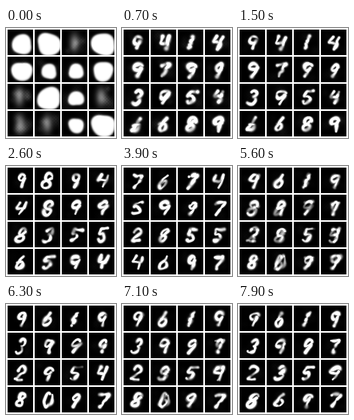
Write a matplotlib script that moves like this. It is 138 px wide and 138 px high and loops after 8 s.

```python
import numpy as np
import matplotlib.pyplot as plt
from matplotlib.animation import FuncAnimation

FRAMES, STEP = 80, 100
TILE, PAD, COLS = 32, 2, 4
SIDE = COLS * (TILE + PAD) + PAD
CELLS = COLS * COLS
N = 48  # points along a stroke

# Digits the tiles pass through, by time step
STAGES = {
    15: "9414" "9799" "3954" "6689",
    26: "9894" "4899" "8355" "6594",
    39: "7674" "5997" "2855" "4697",
    49: "4619" "8877" "7853" "8679",
    63: "9619" "3999" "2954" "8097",
    79: "9619" "3997" "2359" "8697",
}
TIMES = list(STAGES)

# Opening blobs: Large, Medium, Small, or a grey Cloud
START = "MLCL" "MSSM" "CLSC" "CCSL"
RADIUS = {"L": 14.5, "M": 12.5, "S": 9.5}

yy, xx = np.mgrid[:TILE, :TILE].astype(float)


def arc(cy, rx, ry, start, end):
    a = np.radians(np.linspace(start, end, 24))
    return list(zip(rx * np.cos(a), cy + ry * np.sin(a)))


# Pen paths, y down, in -1..1
PATHS = {
    "0": arc(0, .55, .9, -60, 300),
    "1": [(0, -.9), (0, .9)],
    "2": arc(-.45, .55, .45, -170, 50) + [(-.6, .85), (.7, .8)],
    "3": arc(-.45, .5, .45, -150, 80) + arc(.42, .55, .48, -80, 150),
    "4": [(-.45, -.85), (-.6, 0), (.5, 0), (.5, -.85), (.4, .9)],
    "5": [(.65, -.85), (-.35, -.8), (-.45, -.1)] + arc(.35, .5, .5, -110, 140),
    "6": [(.1, -.9)] + arc(.4, .5, .5, 200, -150),
    "7": [(-.6, -.7), (.6, -.8), (.1, .9)],
    "8": arc(-.45, .45, .45, 0, -270) + arc(.45, .5, .45, -90, 270) + [(.45, -.45)],
    "9": arc(-.4, .5, .45, -20, -360) + [(.3, .9)],
}


def smooth(a, k=5):
    pad = np.pad(a, k // 2, mode="edge")
    return np.convolve(pad, np.ones(k) / k, mode="valid")


def wave(rng, knots, amount):
    u = np.linspace(0, knots - 1, N)
    return smooth(np.interp(u, np.arange(knots), rng.normal(0, amount, knots)))


def trace(digit):
    p = np.array(PATHS[digit])
    s = np.r_[0, np.cumsum(np.hypot(*np.diff(p, axis=0).T))]
    u = np.linspace(0, s[-1], N)
    return [smooth(np.interp(u, s, q), 3) for q in p.T]


def write(digit, rng):
    """A digit by an unsteady hand: points, brightness and pen width."""
    x, y = trace(digit)
    slant, wide = rng.normal(.38, .07), rng.normal(.95, .08)
    px = 16 + 8.8 * (x * wide - slant * y) + wave(rng, 9, .7)
    py = 16.3 + 9 * y + wave(rng, 9, .6)
    ink = np.clip(1.05 + wave(rng, 10, .4), .2, 1.3)
    pen = np.clip(1.9 + wave(rng, 10, .5), 1.1, 3)
    return px, py, ink, pen


hand = np.random.default_rng(7)
POSES = {t: [write(d, hand) for d in digits] for t, digits in STAGES.items()}


def blend(i):
    """Poses around step i and the weight of the later one."""
    if i <= TIMES[0]:
        return TIMES[0], TIMES[0], 0
    k = min(np.searchsorted(TIMES, i) - 1, len(TIMES) - 2)
    a, b = TIMES[k], TIMES[k + 1]
    u = (i - a) / (b - a)
    return a, b, u * u * (3 - 2 * u)


def haze(rng):
    """Soft cloudy texture with a fine lattice."""
    g = np.zeros((TILE, TILE))
    for _ in range(6):
        cx, cy = rng.uniform(5, 27, 2)
        w = rng.uniform(2.5, 5)
        g += rng.uniform(.1, .4) * np.exp(-((xx - cx) ** 2 + (yy - cy) ** 2) / (2 * w * w))
    return g * (.85 + .15 * np.cos(np.pi * xx / 2) * np.cos(np.pi * yy / 2))


def blob(kind, rng):
    if kind == "C":
        cx = rng.uniform(13, 17)
        g = np.exp(-((xx - cx) / 6) ** 2 - ((yy - 16) / 11) ** 2)
        return .45 * g + .4 * haze(rng)
    x, y = xx - 17.5, yy - 18
    a = np.arctan2(y, x)
    phase = rng.uniform(0, 2 * np.pi, 2)
    edge = 1 + .05 * np.sin(2 * a + phase[0]) + .05 * np.sin(3 * a + phase[1])
    r = (np.abs(x) ** 2.4 + np.abs(y * 1.06) ** 2.4) ** (1 / 2.4)
    depth = RADIUS[kind] * edge - r
    return 1 / (1 + np.exp(-1.5 * depth)) + .2 * haze(rng)


def stroke(pose, shift, blur):
    px, py, ink, pen = pose
    dx, dy = shift
    d2 = (xx[..., None] - px - dx) ** 2 + (yy[..., None] - py - dy) ** 2
    return np.max(1.15 * ink * np.exp(-(d2 / (pen + blur) ** 2) ** 1.3), axis=-1)


def tile(c, i, rng):
    a, b, u = blend(i)
    young = np.exp(-i / 6)
    melt = np.clip(1 - i / 7, 0, 1)
    shift = [wave(rng, 7, .4 + young) + rng.normal(0, .25) for _ in "xy"]
    g = (1 - u) * stroke(POSES[a][c], shift, 2 * young)
    if u > 0:
        g += u * stroke(POSES[b][c], shift, 2 * young)
    g = (1 - melt) * (g + (.06 + .25 * young) * haze(rng))
    if melt > 0:
        g += melt * blob(START[c], np.random.default_rng(50 + c))
    return np.clip(g, 0, 1)


def picture(i):
    img = np.ones((SIDE, SIDE))
    rng = np.random.default_rng(100 + i)
    for c in range(CELLS):
        top, left = (PAD + k * (TILE + PAD) for k in divmod(c, COLS))
        img[top:top + TILE, left:left + TILE] = tile(c, i, rng)
    return img


fig = plt.figure(figsize=(2, 2), dpi=SIDE / 2)
ax = fig.add_axes([0, 0, 1, 1])
ax.axis("off")
view = ax.imshow(picture(0), cmap="gray", vmin=0, vmax=1,
                 interpolation="nearest", aspect="auto")


def update(i):
    view.set_data(picture(i))
    return [view]


anim = FuncAnimation(fig, update, frames=FRAMES, interval=STEP,
                     repeat=True, repeat_delay=0, blit=False)
plt.show()
```
